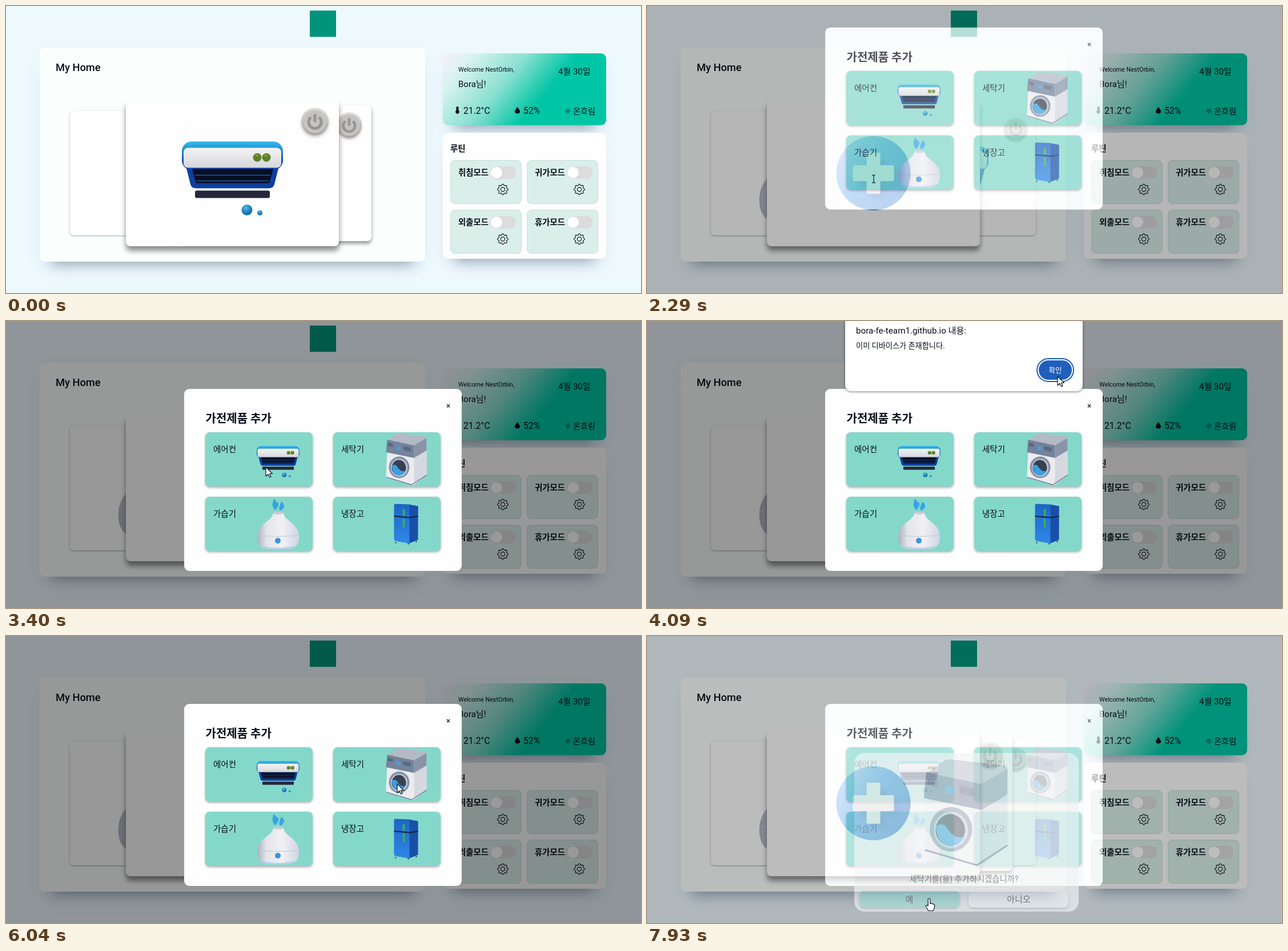
Animation of 1112 by 503 pixels, one loop 8000 ms. Source, as an HTML page:

```html
<!DOCTYPE html>
<html lang="ko">
<head>
<meta charset="utf-8">
<title>Smart home</title>
<style>
html, body { margin: 0; width: 100%; height: 100%; overflow: hidden; background: #eef9fe; }
#stage { position: relative; width: 1112px; height: 503px; overflow: hidden; }
#stage div, #stage svg { position: absolute; box-sizing: border-box; }
svg { left: 0; top: 0; overflow: visible; }
text { font-family: Roboto, "Noto Sans CJK KR", "Noto Sans CJK", sans-serif; fill: #080d18; }
.panel { border-radius: 9px; box-shadow: 0 23px 24px -20px rgba(40,60,90,.5), 0 8px 30px rgba(60,110,160,.03); }
#cards { left: 0; top: 0; isolation: isolate; }
.card { left: 210px; top: 164.5px; width: 373px; height: 256px; border-radius: 8px; background: #fefefe; }
.tile { border-radius: 8px; background: #84d8ca; box-shadow: 0 2px 4px rgba(0,0,0,.35); }
#modal { left: 312px; top: 119px; width: 486px; height: 319px; border-radius: 9px; background: #fefefe; box-shadow: 0 0 0 1200px rgba(0,0,0,.4); }
#confirm { left: 51px; top: 86px; width: 393px; height: 278px; border-radius: 18px; background: #f0f1f2; }
#alert { left: 347px; top: -20px; width: 416px; height: 143px; border-radius: 10px; background: #fff; box-shadow: 0 1px 4px rgba(0,0,0,.5); }
</style>
</head>
<body>
<svg width="0" height="0" style="position:absolute">
  <defs>
    <linearGradient id="gPlus" x1="0" y1=".2" x2="1" y2=".8"><stop offset="0" stop-color="#8fbdf8"/><stop offset=".45" stop-color="#2e8ae6"/><stop offset="1" stop-color="#1565cf"/></linearGradient>
    <linearGradient id="gWhite" x1="0" x2="0" y1="0" y2="1"><stop offset="0" stop-color="#f4f4f5"/><stop offset="1" stop-color="#d6d7dc"/></linearGradient>
    <linearGradient id="gHumid"><stop offset="0" stop-color="#a9b0c0"/><stop offset=".22" stop-color="#e3e4ea"/><stop offset=".6" stop-color="#f1f1f3"/><stop offset="1" stop-color="#d0d5e4"/></linearGradient>
    <linearGradient id="gAc" x1="0" x2="0" y1="0" y2="1"><stop offset="0" stop-color="#35b9ea"/><stop offset=".25" stop-color="#2496d8"/><stop offset=".7" stop-color="#0f49b0"/></linearGradient>
    <linearGradient id="gFridge" x1="0" x2="0" y1="0" y2="1"><stop offset="0" stop-color="#1c66c4"/><stop offset="1" stop-color="#2f87e8"/></linearGradient>
    <linearGradient id="gPower" x1="0" x2="0" y1="0" y2="1"><stop offset="0" stop-color="#dedcd8"/><stop offset="1" stop-color="#a9a7a3"/></linearGradient>
    <radialGradient id="gBall" cx=".4" cy=".3"><stop offset="0" stop-color="#4fc0ea"/><stop offset="1" stop-color="#1a74b4"/></radialGradient>
    <filter id="soft"><feGaussianBlur stdDeviation="3"/></filter>

    <g id="ac"><g transform="translate(-396.5 -292.5)">
      <path d="M314 276H479L470 312Q468 319 460 319H333Q325 319 323 312Z" fill="#0e3f9f"/>
      <rect x="308" y="237" width="177" height="50" rx="17" fill="url(#gAc)"/>
      <rect x="311" y="248" width="171" height="35" rx="8" fill="url(#gWhite)"/>
      <path d="M326 285H468L461 310H333Z" fill="#080e22"/>
      <path d="M331 296H463M334 306H460" stroke="#1d5ba8" stroke-width="1.500"/>
      <circle cx="440" cy="265" r="7.500" fill="#5f8226"/><circle cx="456" cy="265" r="7.500" fill="#5f8226"/>
      <path d="M437 262l4-1M453 262l4-1" stroke="#86a840" stroke-width="3"/>
      <rect x="331" y="323" width="131" height="13" rx="3" fill="#24283a"/>
      <circle cx="422" cy="357" r="9.500" fill="url(#gBall)"/><circle cx="444.500" cy="362" r="4.500" fill="url(#gBall)"/>
    </g></g>

    <g id="plus">
      <circle r="65" fill="url(#gPlus)"/>
      <path d="M-8 -24H22V-6H46V24H22V46H-4V24H-26Z" fill="#0c4fae" opacity=".55" filter="url(#soft)"/>
      <path d="M-9 -36H9Q12 -36 12 -33V-14H33Q36 -14 36 -11V11Q36 14 33 14H12V33Q12 36 9 36H-9Q-12 36 -12 33V14H-33Q-36 14 -36 11V-11Q-36 -14 -33 -14H-12V-33Q-12 -36 -9 -36Z" fill="#e6e6e7"/>
    </g>

    <g id="washer"><g transform="scale(2.37) translate(-700 -242.5)">
      <path d="M667 228L714 238 736 226V268Q736 271 733 273L714 287Q711 288 708 287L669 276Q665 275 665 271Z" fill="#ececf0"/>
      <path d="M714 217L736 204V270L714 287Z" fill="#d6d8e0"/>
      <path d="M683 197.500Q685 197 688 197L733 202Q737 203 735 206L714 219 667 209Z" fill="#b4b9c5"/>
      <path d="M667 208L714 218V240L665 230Z" fill="#74839c"/>
      <path d="M714 218L736 205V227L714 240Z" fill="#8994a8"/>
      <path d="M668 213l9 2v6l-9-2zM695 219l13 3v7l-13-3z" fill="#5a6781"/>
      <circle cx="686.500" cy="223" r="3.500" fill="#4d9ce0"/>
      <ellipse cx="688" cy="256.500" rx="18" ry="19" fill="#8592a8"/>
      <ellipse cx="688" cy="257" rx="14.500" ry="15.500" fill="#c4cad6"/>
      <ellipse cx="687.500" cy="257" rx="12.500" ry="13.500" fill="#39404f"/>
      <path d="M675.500 254Q681 249 686 257T699 263Q695 271 687 270.500Q676 269 675.500 254Z" fill="#3ba0e4"/>
      <path d="M666 274L710 287 736 270" fill="none" stroke="#6e7c94" stroke-width="1.500"/>
    </g></g>

    <g id="humid"><g transform="scale(2.37) translate(-476.5 -355)">
      <path d="M472 331C463 324 468 317 469 310Q472 316 476 318T472 331ZM480 332C476 325 481 322 482 316Q490 322 486 327T480 332Z" fill="#38a3e2"/>
      <path d="M468 336C466 352 440 352 440 379Q440 397 458 399H496Q513 397 513 379C513 352 488 352 486 336Z" fill="url(#gHumid)"/>
      <ellipse cx="477" cy="336" rx="9" ry="2.500" fill="#c9ccd4"/>
      <path d="M440 375Q476 379 513 375" fill="none" stroke="#bfc5d4"/>
      <path d="M447 393Q476 401 507 393Q503 399 496 399H458Q450 399 447 393Z" fill="#b9cdf0"/>
      <circle cx="476" cy="384.500" r="5" fill="#3d93e0"/>
    </g></g>

    <g id="fridge"><g transform="scale(2.37) translate(-700 -355)">
      <path d="M682 320L706 321 721 324Q721 355 720 383L706 389Q705 390 703 389L681 385Q679 384 679 381V323Q679 320 682 320Z" fill="url(#gFridge)"/>
      <path d="M706 322L721 324V383L706 389Z" fill="#1a4fa8"/>
      <path d="M679 341.500L706 344 721 342" fill="none" stroke="#14223f" stroke-width="2"/>
      <path d="M696 329V341M696 346V361" stroke="#3fae4c" stroke-width="3.500"/>
      <path d="M682 387v2M704 389v2M718 385v2" stroke="#14223f" stroke-width="2"/>
    </g></g>

    <g id="power">
      <circle cy="3" r="23" fill="#000" opacity=".3" filter="url(#soft)"/>
      <circle r="24" fill="url(#gPower)"/><circle r="20" fill="#c6c4c0"/>
      <path d="M-7 -7.500A11 11 0 1 0 7 -7.500M0 -13V1" fill="none" stroke="#979694" stroke-width="5"/>
    </g>
  </defs>
</svg>
<div id="stage"></div>
<script>
const svg = (body, attrs = '') => `<svg width="1" height="1" ${attrs}>${body}</svg>`;
const text = (x, y, size, str, attrs = '') => `<text x="${x}" y="${y}" font-size="${size}" ${attrs}>${str}</text>`;
const box = (x, y, w, h, cls, style = '', body = '') =>
  `<div class="${cls}" style="left:${x}px;top:${y}px;width:${w}px;height:${h}px;${style}">${body}</div>`;
const use = (id, x, y, k = 1) => `<use href="#${id}" transform="translate(${x} ${y}) scale(${k})"/>`;
const medium = 'font-weight="500"', bold = 'font-weight="700"', middle = 'text-anchor="middle"';

function gear(x, y) {
  const pts = Array.from({ length: 64 }, (_, i) => {
    const a = i * Math.PI / 32, r = 8.3 + 1.2 * Math.cos(8 * a);
    return (x + r * Math.cos(a)).toFixed(1) + ',' + (y + r * Math.sin(a)).toFixed(1);
  });
  return `<g fill="none" stroke="#111" stroke-width="1.1"><polygon points="${pts.join(' ')}"/><circle cx="${x}" cy="${y}" r="3.6"/></g>`;
}

function routine(name, i) {
  const x = 778 + i % 2 * 134, y = 270 + (i >> 1) * 86.5;
  return box(x, y, 125, 77, '', 'border-radius:8px;background:#daefe9;border:1px solid #c9ddd7', svg(
    text(13, 26, 14.4, name, bold) +
    '<rect x="69" y="10" width="45" height="22" rx="11" fill="#dcdcdc"/><circle cx="80" cy="21" r="10" fill="#fff"/>' +
    gear(91, 50.5)));
}

function product([name, id], i) {
  return box(37 + i % 2 * 224, 76 + (i >> 1) * 112.5, 188, 95, 'tile', '',
    svg(text(14, 35, 14.5, name) + use(id, 127.5, 47.5, .422)));
}

const card = id => `<div class="card" id="card-${id}">${svg(use(id, 186.5, 128) + (id == 'plus' ? '' : use('power', 331, 37.5)))}</div>`;

const page = box(59, 73, 675, 375, 'panel', 'background:#fafffd') +
  box(765, 83, 286, 126, 'panel', 'background:linear-gradient(130deg,#f4f0fa 2%,#d8f4ef 14%,#8ae0d1 38%,#00c6a5 61%)') +
  box(765, 222, 286, 221, 'panel', 'background:#fefefe') +
  ['취침모드', '귀가모드', '외출모드', '휴가모드'].map(routine).join('') +
  svg('<rect x="532" y="8" width="46" height="46" fill="#00957a"/>' +
    text(87, 114, 18.3, 'My Home', medium) +
    text(792, 115, 10.8, 'Welcome NestOrbin,') + text(792, 142, 15, 'Bora님!') +
    text(967, 120, 15, '4월 30일') + text(801, 189, 15.7, '21.2°C') +
    text(906, 189, 15.7, '52%') + text(993, 189, 14.2, '온흐림') + text(778, 255, 14.5, '루틴', bold) +
    '<path d="M788.500 178a2 2 0 0 1 4 0v5a3.200 3.200 0 1 1 -4 0zM895.500 177q9 11 0 11.500q-9 -.5 0 -11.500z" fill="#060a10"/>' +
    '<g fill="none" stroke="#222"><circle cx="984" cy="184" r="2.200"/><circle cx="984" cy="184" r="4.300" stroke-dasharray="1.2 2.18"/></g>');

const modal = `<div id="modal">${
  [['에어컨', 'ac'], ['세탁기', 'washer'], ['가습기', 'humid'], ['냉장고', 'fridge']].map(product).join('')}${
  svg(text(37.5, 59, 20, '가전제품 추가', bold) + '<path d="M460 27l5 5.500m0 -5.500l-5 5.500" stroke="#222" stroke-width="1.3"/>')
  }<div id="confirm">${
    box(9, 242, 175, 29, 'tile') + box(200, 242, 175, 29, 'tile', 'background:#fefefe') +
    svg(use('washer', 194, 105, .87) + text(192, 226, 14.3, '세탁기를(을) 추가하시겠습니까?', middle) +
      text(96.5, 262, 15, '예', middle) + text(288, 262, 15, '아니오', middle))
  }</div></div>`;

const alertBox = `<div id="alert">${svg(
  text(19, 42, 15.2, 'bora-fe-team1.github.io 내용:') + text(19, 68, 13.2, '이미 디바이스가 존재합니다.') +
  '<rect x="336" y="86" width="64" height="40" rx="20" fill="none" stroke="#1b5bbf" stroke-width="2"/>' +
  '<rect id="ok" x="339" y="89" width="58" height="34" rx="17"/>' +
  text(368, 110.5, 12.5, '확인', middle + ' style="fill:#fff"'))}</div>`;

const shapes = {
  arrow: 'M0 0V16L4 12.500 6.500 18 9 17 6.500 11.500H11.500Z',
  hand: 'M-1.800 1.800a1.800 1.800 0 0 1 3.600 0V9Q3 7.800 4.500 9.300 6 8.500 7 10 9 9.500 9.500 11.500V15Q9 18 7.500 21.500H-1.500Q-2 19 -6 13.500 -5 10.500 -1.800 13Z',
  beam: 'M-3 -7Q0 -7 0 -5 0 -7 3 -7M0 -5V5M-3 7Q0 7 0 5 0 7 3 7'
};

const stage = document.getElementById('stage');
stage.innerHTML = page + `<div id="cards">${['plus', 'ac', 'humid', 'washer'].map(card).join('')}</div>` + modal + alertBox +
  svg('<path fill="#fff" stroke="#0a1230" stroke-width="1.2" stroke-linejoin="round"/>', 'id="cursor"');
const el = id => document.getElementById(id);
const pointer = el('cursor').firstChild;

const clamp = v => Math.max(0, Math.min(1, v));
const mix = (a, b, p) => a + (b - a) * p;
const smooth = p => p * p * (3 - 2 * p);

// Carousel places: x offset and scale
const front = [0, 1], left = [-126, .852], right = [126, .852], near = [70, .93];

function placeCard(id, from, to, p) {
  const x = mix(from[0], to[0], p), k = mix(from[1], to[1], p), lift = clamp((k - .852) / .148);
  Object.assign(el('card-' + id).style, {
    transform: `translateX(${x}px) scale(${k})`,
    zIndex: Math.round(k * 1000),
    boxShadow: `0 ${1 + 7 * lift}px ${3 + 7 * lift}px rgba(0,0,0,${.35 + .1 * lift})`
  });
}

// Pointer path: time, x, y
const path = [[330, 812, 452], [800, 165, 300], [1080, 165, 300], [1290, 265, 296], [1440, 389, 312],
  [1630, 389, 312], [1760, 396, 302], [2200, 396, 302], [2290, 397, 303], [2450, 400, 304], [2830, 400, 304],
  [3400, 455, 256], [3680, 455, 256], [4090, 719, 97], [4570, 719, 97], [5250, 684, 278],
  [5970, 684, 278], [6040, 685, 259], [6170, 684, 244], [6900, 684, 244], [7460, 494, 460], [8000, 494, 460]];

function drawPointer(t) {
  const i = Math.max(1, path.findIndex(k => k[0] > t)), a = path[i - 1], b = path[i];
  const p = smooth(clamp((t - a[0]) / (b[0] - a[0])));
  const x = mix(a[1], b[1], p), y = mix(a[2], b[2], p);
  const overCard = t < 2200 && x < 640, overYes = t > 6900 && y > 446;
  const kind = overCard || overYes ? 'hand' : t > 2200 && t < 2440 ? 'beam' : 'arrow';
  pointer.setAttribute('d', shapes[kind]);
  pointer.setAttribute('fill', kind == 'beam' ? 'none' : '#fff');
  pointer.setAttribute('transform', `translate(${x} ${y})`);
  el('cursor').style.opacity = t < 330 ? 0 : 1;
}

function draw(t) {
  const turn = 1 - (1 - smooth(clamp((t - 740) / 700))) ** 1.4;
  placeCard('plus', left, front, turn);
  placeCard('ac', front, right, turn);
  placeCard('humid', near, left, turn);
  placeCard('washer', near, near, 0);
  el('card-washer').style.display = t > 7000 ? '' : 'none';

  const open = 1 - (1 - clamp((t - 2030) / 485)) ** 1.6;
  const fade = 1 - .35 * clamp((t - 7690) / 240);
  el('modal').style.opacity = open * fade;
  el('modal').style.transform = `translateY(${-280 * (1 - open)}px)`;
  el('confirm').style.opacity = clamp((t - 6400) / 170) * fade;

  el('alert').style.display = t >= 3470 && t < 4570 ? '' : 'none';
  el('ok').setAttribute('fill', t > 4000 ? '#1f5fbd' : '#0b57d0');
  drawPointer(t);
}

function tick() {
  draw(performance.now() % 8000);
  requestAnimationFrame(tick);
}
tick();
</script>
</body>
</html>
```
